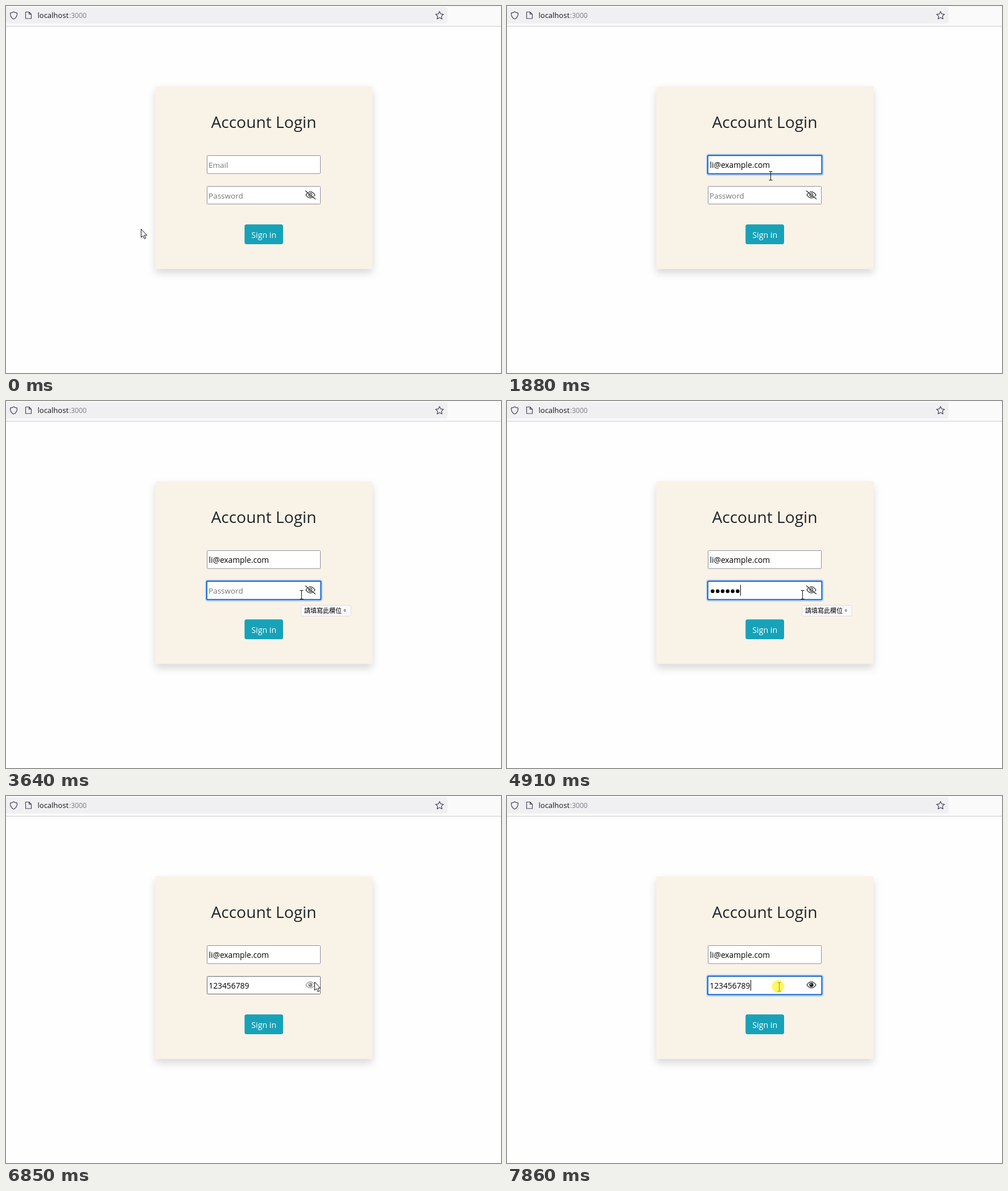
These frames come from a looping animation (870 by 644 pixels, 7990 ms). An HTML page:

```html
<!DOCTYPE html>
<html lang="en">
<head>
<meta charset="utf-8">
<title>Account Login</title>
<style>
  html, body { margin: 0; height: 100%; overflow: hidden; background: #fefefe; }
  svg { display: block; font: 13.8px "Open Sans", "Noto Sans", sans-serif; }
  .card { filter: drop-shadow(0 7px 7px rgba(0, 0, 0, .15)); }
  .hint { font-size: 13.5px; fill: #757575; }
  .box { fill: #fff; stroke: #8f8f9d; }
  .box.hover { stroke: #676774; }
  .line { fill: none; stroke: #45455c; stroke-width: 1.2; stroke-linejoin: round; }
  .eye { fill: none; stroke: #212529; stroke-width: 1.3; stroke-linecap: round; }
  .tip { font: 11px "Noto Sans CJK TC", "Noto Sans CJK", sans-serif; fill: #000; }
</style>
</head>
<body>
<svg width="870" height="644" viewBox="0 0 870 644">
  <rect width="870" height="35" fill="#fafafb"/>
  <rect x="-6" y="2" width="782" height="28.5" rx="4" fill="#f0f0f2"/>
  <path d="M0 35.5H870" stroke="#ccc"/>
  <g class="line">
    <path d="M13.5 10Q16 12 19.5 12.2Q20 20 13.5 23Q7 20 7.5 12.2Q11 12 13.5 10Z"/>
    <path d="M34.5 10.5H40.5L44.5 14.5V22H34.5ZM40.5 10.5V14.5H44.5"/>
    <path id="star"/>
  </g>
  <text x="55.5" y="21" font-size="13" fill="#15141a">localhost</text>
  <text x="111" y="21" font-size="12" fill="#7b7b85">:3000</text>

  <rect class="card" x="262.5" y="141" width="381.5" height="320.5" fill="#f9f2e7"/>
  <text x="453" y="214" font-size="28.2" text-anchor="middle" fill="#212529">Account Login</text>
  <rect x="419.3" y="383.2" width="67.7" height="34.8" rx="3.5" fill="#17a2b8"/>
  <text x="453.2" y="407" font-size="14.2" text-anchor="middle" fill="#fff">Sign in</text>

  <rect id="emailBox" class="box" x="353.5" y="262.5" width="199" height="31.5" rx="1"/>
  <rect id="passBox" class="box" x="353.5" y="316.5" width="199" height="31" rx="1"/>
  <g id="ring" fill="none" stroke-width="2">
    <rect x="351" y="260.3" width="204.5" height="36.6" rx="3.5" stroke="#b5d5f7"/>
    <rect x="352.8" y="262.3" width="200.6" height="32.3" rx="1.5" fill="#fff" stroke="#0a5fd0"/>
  </g>

  <text id="emailHint" class="hint" x="356" y="284">Email</text>
  <text id="email" x="356.5" y="284">li@example.com</text>
  <text id="passHint" class="hint" x="356" y="338">Password</text>
  <path id="dots" stroke="#000" stroke-width="6.6" stroke-linecap="round" stroke-dasharray="0 8.8"/>
  <rect id="selection" y="322" height="20" fill="#0078d7"/>
  <text id="digits" x="356.3" y="338"><tspan id="plain"></tspan><tspan id="picked" fill="#fff"></tspan></text>
  <path id="caret" stroke="#000"/>

  <g id="icon" class="eye" transform="translate(535 331.5)">
    <path d="M-8 0Q-4.5-5.3 0-5.3T8 0Q4.5 5.3 0 5.3T-8 0Z"/>
    <g id="open">
      <circle r="3" fill="#212529"/>
      <circle cx="-1.2" cy="-1.2" r=".9" fill="#fff" stroke="none"/>
    </g>
    <g id="slashed">
      <circle r="2.8"/>
      <path d="M-7.5-7.6L9.5 6.4" stroke="#fff"/>
      <path d="M-8.5-7L8.5 7"/>
    </g>
  </g>

  <g id="tooltip">
    <rect x="518.5" y="358.5" width="87.5" height="19" rx="2" fill="#f9f9fb" stroke="#dedee0"/>
    <text class="tip" lang="zh-Hant" x="524" y="372">請填寫此欄位。</text>
  </g>

  <path id="arrow" d="M.5 .5V15L3.8 12L6.3 17.6L8.6 16.6L6.2 11.2H10.6Z" fill="#fff" stroke="#111"/>
  <path id="beam" d="M-3-7.5H3M0-7V7M-3 7.5H3" fill="none" stroke="#111"/>
  <circle id="press" r="11" fill="#fff000" opacity=".6"/>
</svg>
<script>
const LOOP = 7990, BLINK = 530, KEY_GAP = 175;
const EMAIL_CLICK = 750, EMAIL_FILLED = 1610, PASS_CLICK = 2690, TIP_SHOWN = 3640;
const TYPING = 3970, TIP_HIDDEN = 5935, EYE_CLICK = 6710, DRAG = 7450;
const PASSWORD = '123456789', TEXT_X = 356.5, DIGIT = 7.93, DOT = 8.8;
const FIELD_GAP = 54;
const LAST_KEY = TYPING + KEY_GAP * (PASSWORD.length - 1);

const ui = Object.fromEntries([...document.querySelectorAll('[id]')].map(e => [e.id, e]));
const clamp = (v, min, max) => Math.max(min, Math.min(max, v));
const progress = (t, start, end) => clamp((t - start) / (end - start), 0, 1);
const show = (el, on) => el.style.display = on ? '' : 'none';
const moveTo = (el, x, y) => el.setAttribute('transform', `translate(${x} ${y})`);

const starPoints = Array.from({ length: 10 }, (_, i) => {
  const r = i % 2 ? 3.5 : 7.3, a = i * Math.PI / 5;
  return [762 + r * Math.sin(a), 16.8 - r * Math.cos(a)];
});
ui.star.setAttribute('d', `M${starPoints.join('L')}Z`);

// Pointer position: glides to each stop, then a swing left and back while selecting
function pointer(t) {
  let x = 237, y = 391;
  const glide = (start, end, toX, toY) => {
    const k = progress(t, start, end);
    x += (toX - x) * k;
    y += (toY - y) * k;
  };
  glide(70, 680, 462, 277);
  glide(1810, 2020, 465, 340);
  glide(2960, 3240, 519, 340);
  glide(5900, 5970, 567, 302);
  glide(6230, 6440, 542, 326);
  glide(6980, 7190, 456, 346);
  glide(DRAG, 7860, 478, 335);
  x -= 128 * Math.sin(Math.PI * progress(t, DRAG, 7860));
  return [x, y];
}

function caretVisible(t) {
  if (t < EMAIL_CLICK || t >= EYE_CLICK && t < DRAG) return false;
  if (t >= TYPING && t < LAST_KEY) return true;
  const reset = [EMAIL_CLICK + 75, PASS_CLICK, LAST_KEY, DRAG].findLast(r => t >= r) ?? t;
  return Math.floor((t - reset) / BLINK) % 2 === 0;
}

function draw(t) {
  const [x, y] = pointer(t);
  const dragging = t >= DRAG, inEmail = t < PASS_CLICK;
  const revealed = t >= EYE_CLICK + 130;
  const typed = clamp(Math.floor((t - TYPING) / KEY_GAP) + 1, 0, PASSWORD.length);
  const over = (top, pad = 0) => x > 353 - pad && x < 553 + pad && y > top - pad && y < top + 32 + pad;
  const onIcon = x > 525 && over(316);

  ui.emailBox.classList.toggle('hover', over(262));
  ui.passBox.classList.toggle('hover', over(316));
  show(ui.ring, t >= EMAIL_CLICK && t < EYE_CLICK || dragging);
  moveTo(ui.ring, 0, inEmail ? 0 : FIELD_GAP);

  show(ui.emailHint, t < EMAIL_FILLED);
  show(ui.email, t >= EMAIL_FILLED);
  show(ui.passHint, !typed);
  show(ui.dots, typed && !revealed);
  ui.dots.setAttribute('d', `M361.4 333.8h${Math.max(0, typed - 1) * DOT + .1}`);

  const split = dragging ? clamp(Math.round((x - TEXT_X) / DIGIT), 0, PASSWORD.length) : PASSWORD.length;
  const picked = PASSWORD.length - split;
  show(ui.digits, revealed);
  ui.plain.textContent = PASSWORD.slice(0, split);
  ui.picked.textContent = PASSWORD.slice(split);
  ui.selection.setAttribute('x', TEXT_X + split * DIGIT);
  ui.selection.setAttribute('width', picked * DIGIT);

  const textWidth = inEmail ? (t < EMAIL_FILLED ? 0 : 104)
    : typed * (revealed ? DIGIT : DOT);
  show(ui.caret, caretVisible(t) && !picked);
  ui.caret.setAttribute('d', `M${Math.floor(357.2 + textWidth) + .5} ${inEmail ? 269 : 322.5}v19`);

  show(ui.open, revealed);
  show(ui.slashed, !revealed);
  ui.icon.setAttribute('opacity', onIcon ? .5 : 1);
  show(ui.tooltip, t >= TIP_SHOWN && t < TIP_HIDDEN);

  const overText = dragging || !onIcon && (over(262, 6) || over(316, 6));
  show(ui.beam, overText);
  show(ui.arrow, !overText);
  moveTo(ui.beam, Math.floor(x) + .5, Math.round(y));
  moveTo(ui.arrow, x, y);
  show(ui.press, dragging || [EMAIL_CLICK, PASS_CLICK, EYE_CLICK].some(c => t >= c && t < c + 130));
  moveTo(ui.press, x - 1.5, y - 1);
}

function tick() {
  draw(performance.now() % LOOP);
  requestAnimationFrame(tick);
}
tick();
</script>
</body>
</html>
```
